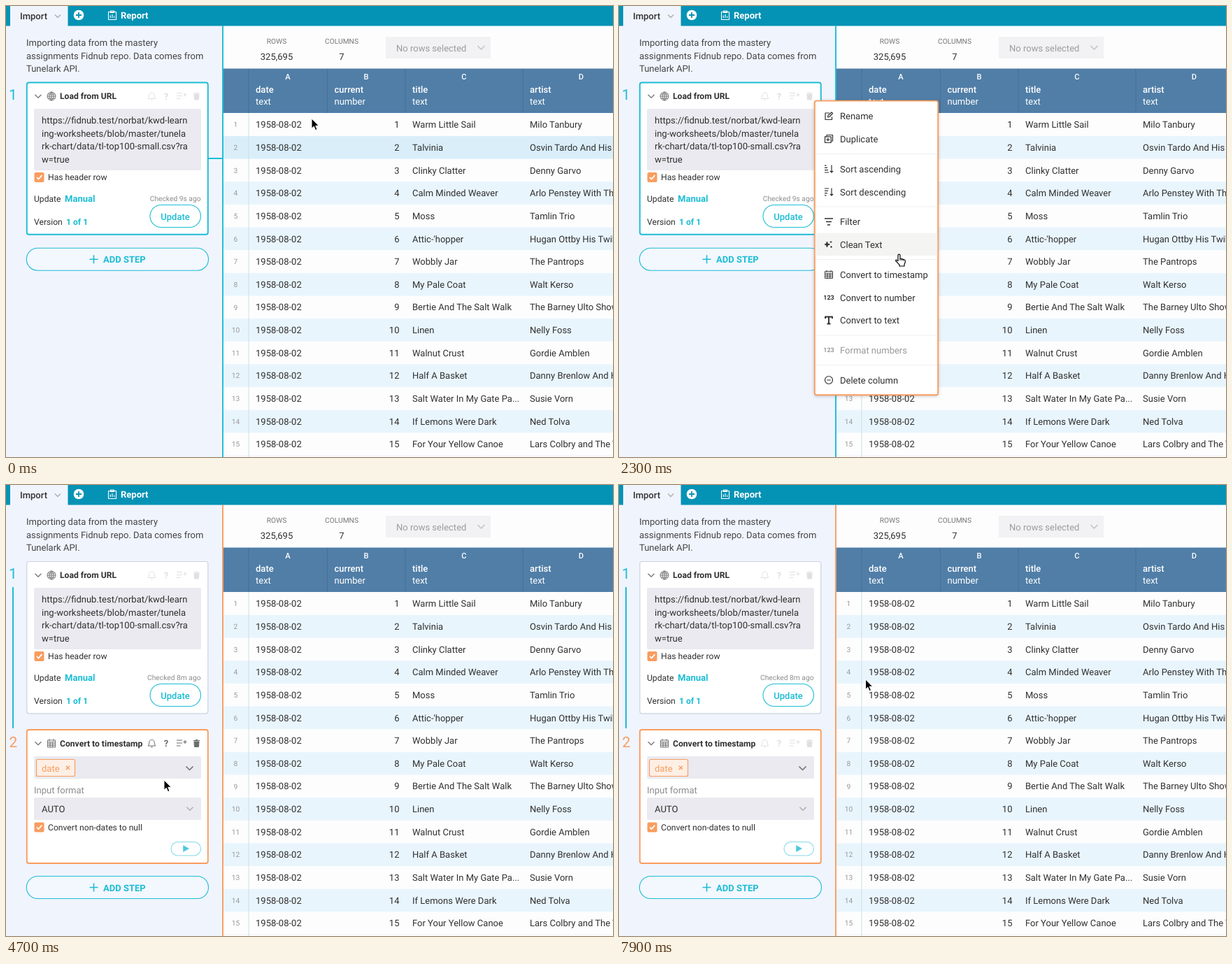
Write an HTML page that moves like this. It is 868 by 645 pixels and loops after 8000 ms.

```html
<!DOCTYPE html>
<html lang="en">
<head>
<meta charset="utf-8">
<title>Convert a column to timestamp</title>
<style>
  html, body { margin: 0; width: 100%; height: 100%; overflow: hidden; background: #fdfdfe; }
  svg { display: block; width: 868px; height: 645px; }
  text { font-family: Roboto, "Liberation Sans", sans-serif; text-rendering: geometricPrecision; white-space: pre; }
  #menu { filter: drop-shadow(0 1px 2px rgba(0, 0, 0, .2)); }
</style>
</head>
<body>
<svg id="stage" viewBox="0 0 868 645" xmlns="http://www.w3.org/2000/svg"></svg>
<script>
const LOOP = 8000, STEP = 100;
const TEAL = '#1cbdd4', ORANGE = '#f99d5f', INK = '#303030', GRAY = '#8c8c8c', PANEL = '#f0f4fd', FIELD = '#eaeaf0';
const BASE = 13.03, SMALL = 12.13, TINY = 10.26, ROW = 32.645;
const TIMES = { button: [700, 1500], menu: [1000, 3000], done: 3000, card: 3900, tools: [4300, 6400] };

// ---- drawing helpers; text is placed by the middle of its capitals ----
const text = (x, y, s, { size = BASE, fill = INK, weight = 400, anchor = 'start' } = {}) =>
  `<text x="${x}" y="${(y + size * 0.355).toFixed(2)}" font-size="${size}" fill="${fill}" font-weight="${weight}" text-anchor="${anchor}">${s}</text>`;
const rect = (x, y, w, h, fill, stroke = 'none', sw = 1, r = 0) =>
  `<rect x="${x}" y="${y}" width="${w}" height="${h}" rx="${r}" fill="${fill}" stroke="${stroke}" stroke-width="${sw}"/>`;
const line = (d, stroke = INK, sw = 1.2, fill = 'none') =>
  `<path d="${d}" fill="${fill}" stroke="${stroke}" stroke-width="${sw}" stroke-linejoin="round"/>`;
const at = (x, y, body) => `<g transform="translate(${x} ${y})">${body}</g>`;
const group = (id, body) => `<g id="${id}">${body}</g>`;
const chevron = (x, y, c = '#777', r = 4.5, sw = 1.3) => at(x, y, line(`M${-r} ${-r / 2}L0 ${r / 2}L${r} ${-r / 2}`, c, sw));
const checkbox = (y, label) => rect(40.5, y - 7, 14, 14, ORANGE, 'none', 0, 2) +
  at(47.5, y, line('M-3.5 0L-1 2.6L3.8-2.8', '#fff', 1.8)) + text(60, y, label, { size: SMALL });

// ---- icons, each centred on 0,0 ----
const icon = {
  edit: c => line('M1-4.5H-5V5H4.5V1M-1.5 1.5L-1-1L4-5.5L5.5-4L1 1Z', c),
  copy: c => line('M-3-3.5V-5.5H5.5V3H3.5M-5.5-3.2H3.2V5.5H-5.5ZM-1.2-1.2V3.5M-3.5 1.2H1.2', c),
  up: c => line('M-6 5H0M-6 1.7H-1M-6-1.6H-2M-6-4.9H-3.5M4-5.5V5M1.8 2.8L4 5L6.2 2.8', c),
  down: c => line('M-6-5H0M-6-1.7H-1M-6 1.6H-2M-6 4.9H-3.5M4-5.5V5M1.8 2.8L4 5L6.2 2.8', c),
  filter: c => line('M-6-4.5H6M-4 0H4M-2 4.5H2', c, 1.5),
  sparkle: c => line('M-2.5-4L-1.5-1L1.5 0L-1.5 1L-2.5 4L-3.5 1L-6 0L-3.5-1ZM3-5V-2M1.5-3.5H4.5M3.5 2V5M2 3.5H5', c, .9, c),
  calendar: c => line('M-5.5-4.5H5.5V5.5H-5.5ZM-5.5-1.8H5.5M-5.5 .7H5.5M-5.5 3.1H5.5M-2-1.8V5.5M1.7-1.8V5.5M-3-6.3V-3.5M3-6.3V-3.5', c, .9),
  digits: c => text(0, 0, '123', { size: 9, fill: c, weight: 700, anchor: 'middle' }),
  type: c => line('M-5-2.5V-5H5V-2.5M0-5V5M-2.5 5H2.5', c, 1.9),
  minus: c => line('M-5.5 0a5.5 5.5 0 1 0 11 0a5.5 5.5 0 1 0-11 0M-2.8 0H2.8', c),
  globe: c => line('M-6 0a6 6 0 1 0 12 0a6 6 0 1 0-12 0H6M0-6V6M0-6C-4-3-4 3 0 6C4 3 4-3 0-6M-5-3H5M-5 3H5', c, .9),
  bell: c => line('M-5.5 3.5C-3.5 2-4-1-3.5-2.5C-2.5-6 2.5-6 3.5-2.5C4-1 3.5 2 5.5 3.5ZM-1.3 5.3H1.3', c, 1),
  list: c => line('M-7-4.5H1M-7-.5H1M-7 3.5H-1.5M2.5-2H7.5M5-4.5V.5', c),
  trash: c => line('M-3.5-2.5H3.5L3 5H-3ZM-4.8-4H4.8M-1.5-5H1.5', c, 1, c)
};
const tools = (y, c) => at(208.5, y, icon.bell(c)) +
  text(229, y, '?', { fill: c, weight: 700, anchor: 'middle' }) +
  at(251, y, icon.list(c)) + at(272.5, y, icon.trash(c));
const cardHead = (y, glyph, title) => chevron(46, y) + at(65, y, icon[glyph]('#666')) +
  text(77, y, title, { size: SMALL, weight: 700 });

// ---- table data ----
const rows = [
  ['Warm Little Sail', 'Milo Tanbury'], ['Talvinia', 'Osvin Tardo And His Quintet'],
  ['Clinky Clatter', 'Denny Garvo'], ['Calm Minded Weaver', 'Arlo Penstey With The Lows'],
  ['Moss', 'Tamlin Trio'], ["Attic-'hopper", 'Hugan Ottby His Twilight Guests'],
  ['Wobbly Jar', 'The Pantrops'], ['My Pale Coat', 'Walt Kerso'],
  ['Bertie And The Salt Walk', 'The Barney Ulto Show'], ['Linen', 'Nelly Foss'],
  ['Walnut Crust', 'Gordie Amblen'], ['Half A Basket', 'Danny Brenlow And His Rovers'],
  ['Salt Water In My Gate Pa...', 'Susie Vorn'], ['If Lemons Were Dark', 'Ned Tolva'],
  ['For Your Yellow Canoe', 'Lars Colbry and The Tidemen']
];
const columns = [[347, 403, 'A', 'date', 'text'], [459.5, 515, 'B', 'current', 'number'],
  [571, 655, 'C', 'title', 'text'], [739, 822.5, 'D', 'artist', 'text']];

const menu = [[157.5, 'edit', 'Rename'], [190, 'copy', 'Duplicate'], [233, 'up', 'Sort ascending'],
  [266, 'down', 'Sort descending'], [308.5, 'filter', 'Filter'], [341, 'sparkle', 'Clean Text'],
  [384, 'calendar', 'Convert to timestamp'], [417, 'digits', 'Convert to number'],
  [449.5, 'type', 'Convert to text'], [492, 'digits', 'Format numbers'], [535, 'minus', 'Delete column']];
const DISABLED = 'Format numbers';

function table() {
  const mid = { anchor: 'middle' };
  let s = rect(310, 28, 558, 617, '#fdfdfe') +
    text(387, 50.5, 'ROWS', { ...mid, size: TINY, fill: '#777' }) + text(387, 72, '325,695', mid) +
    text(480, 50.5, 'COLUMNS', { ...mid, size: TINY, fill: '#777' }) + text(480, 72, '7', mid) +
    rect(543, 44, 150, 31, '#f2f2f4') + text(558, 60, 'No rows selected', { fill: '#9c9c9c' }) +
    chevron(679.5, 59.5, '#c2c2c2', 5, 1.5);
  rows.forEach(([title, artist], i) => {
    const top = 153.3 + ROW * i, y = 169.7 + ROW * i;
    if (i % 2) s += `<rect ${i === 1 ? 'id="second"' : ''} x="310" y="${top}" width="558" height="${ROW}" fill="#e9f5fd"/>`;
    s += text(328.5, y, i + 1, { ...mid, size: TINY, fill: '#999' }) + text(357, y, '1958-08-02') +
      text(562.5, y, i + 1, { anchor: 'end' }) + text(581, y, title) + text(749, y, artist);
  });
  s += line('M310 643H868', '#eef2f6', 1) + line('M347 153V645', '#cfdfe2', 1) + rect(310, 89.5, 558, 63.5, '#507ea7');
  for (const [x, cx, letter, name, kind] of columns) {
    s += line(`M${x} 90V153`, '#456f98', 1) +
      text(cx, 101.5, letter, { ...mid, size: 11.2, fill: '#fff', weight: 500 }) +
      text(x + 10, 119.5, name, { fill: '#fff', weight: 500 }) + text(x + 10, 136.5, kind, { fill: '#fff' });
  }
  return s;
}

function topBar() {
  return rect(0, 0, 868, 28.5, '#0593b5') + rect(6, 0, 82.5, 29, PANEL) +
    text(20, 14, 'Import', { weight: 500 }) + chevron(74, 14.5, '#aaa', 4) +
    '<circle cx="104" cy="13" r="7.3" fill="#fff"/>' + line('M100 13H108M104 9V17', '#0593b5', 1.8) +
    at(152, 13.5, line('M-5.5-5H5.5V6H-5.5ZM-2.5-6.5H2.5V-4H-2.5ZM-2.7 3.5V0M0 3.5V-1.5M2.7 3.5V1', '#fff', 1.1)) +
    text(164, 13.5, 'Report', { fill: '#fff', weight: 700 });
}

function firstCard() {
  const url = ['https://fidnub.test/norbat/kwd-learn', 'ing-worksheets/blob/master/tunela',
    'rk-chart/data/tl-top100-small.csv?ra', 'w=true'];
  return text(10, 127, '1', { size: 21, fill: TEAL, anchor: 'middle' }) +
    `<rect id="frame" x="29.8" y="109.5" width="259" height="217.3" rx="3" fill="#fff"/>` +
    cardHead(129, 'globe', 'Load from URL') + tools(129, '#e0e0e4') + rect(40, 147, 239, 88, FIELD, 'none', 0, 2) +
    url.map((s, i) => text(51, 163.3 + 18.65 * i, s)).join('') +
    checkbox(245, 'Has header row') +
    text(40, 275.5, 'Update', { size: SMALL }) + text(84, 275.5, 'Manual', { fill: TEAL, weight: 700 }) +
    group('fresh', text(278.5, 275.5, 'Checked 9s ago', { size: TINY, fill: GRAY, anchor: 'end' })) +
    group('stale', text(278.5, 275.5, 'Checked 8m ago', { size: TINY, fill: GRAY, anchor: 'end' })) +
    text(40, 308.5, 'Version', { size: SMALL }) + text(86, 308.5, '1 of 1', { fill: TEAL, weight: 700, size: SMALL }) +
    rect(206, 284.5, 72.5, 32, '#fff', TEAL, 1.1, 16) +
    text(242, 301.3, 'Update', { fill: TEAL, weight: 500, anchor: 'middle' });
}

function secondCard() {
  return text(10.5, 367.5, '2', { size: 21, fill: ORANGE, anchor: 'middle' }) +
    rect(29.8, 350, 259, 191, '#fff', ORANGE, 1.9, 3) + cardHead(369.5, 'calendar', 'Convert to timestamp') +
    group('faint', tools(369.5, '#e0e0e4')) + group('dark', tools(369.5, '#6c6c6c')) +
    rect(40, 388, 239, 32, FIELD, 'none', 0, 2) + rect(43.5, 392.5, 55, 24, '#fdefe5', ORANGE, 1.2, 2) +
    text(51, 405, 'date', { fill: ORANGE }) + line('M85.8 401.8L91 407M91 401.8L85.8 407', ORANGE, 1.4) +
    chevron(262.5, 405, '#777', 5, 1.7) + text(40, 436.5, 'Input format', { fill: GRAY }) +
    rect(40, 447, 239, 32, FIELD, 'none', 0, 2) + text(51, 463.5, 'AUTO') + chevron(263, 463, '#aaa', 4.5) +
    checkbox(489.5, 'Convert non-dates to null') + rect(236, 510.5, 42.5, 19.5, '#fff', '#83d8e8', 1.1, 9.75) +
    line('M253.5 515.5V524.5L261.5 520Z', '#4cc8dd', .5, '#4cc8dd');
}

function sidePanel() {
  const about = ['Importing data from the mastery', 'assignments Fidnub repo. Data comes from', 'Tunelark API.'];
  return rect(0, 28.5, 310, 617, PANEL) + about.map((s, i) => text(29, 52.5 + 18.65 * i, s, { fill: '#444' })).join('') +
    group('link', line('M289 218H309', TEAL, 2)) + group('rail', line('M10 146V348', TEAL, 2)) + firstCard() +
    group('card', secondCard()) +
    group('add', rect(29.3, -16, 260.2, 32, '#f3f7fe', TEAL, 1.1, 16) + line('M119.5 0H131.5M125.5-6V6', TEAL, 1.6) +
      text(139, .5, 'ADD STEP', { fill: TEAL, weight: 700 })) +
    '<path id="edge" d="M310 28.5V645" stroke-width="1.9"/>';
}

function popup() {
  const items = menu.map(([y, glyph, label]) => {
    const c = label === DISABLED ? '#999' : INK;
    return at(300, y, icon[glyph](c)) + text(316, y + .3, label, { fill: c });
  }).join('');
  const rules = [211.5, 287, 362.5, 471, 513.5].map(y => line(`M281 ${y}H455`, '#f0f0f4', 1)).join('');
  return rect(279.8, 135.6, 176.4, 420.6, '#fff', ORANGE, 1.9, 3) +
    '<rect id="hover" x="280.8" width="174.4" height="32.6" fill="#f4f4f2"/>' + rules + items;
}

const arrow = line('M0 0V14.2L3.3 11.2L5.6 16.6L8 15.6L5.7 10.3H10.2Z', '#fff', 1, '#000');
const hand = line('M-1 1C-1-.8 2-.8 2 1V6L4 6.1L6.5 6.8L9 8C9.8 9 9 12.5 8 14V16.5H1V14.5C-1 12.5-2.5 10.8-4.3 9C-4.5 7.2-2.7 7.4-1 9Z', '#000', 1.2, '#fff') +
  line('M2 6V8.5M4.3 6.3V8.7M6.6 7V9', '#000', .9);

const stage = document.getElementById('stage');
stage.innerHTML = table() + sidePanel() + topBar() +
  group('button', `<circle cx="445.5" cy="121" r="11.5" fill="${ORANGE}"/>` + chevron(445.5, 121.5, '#fff', 5, 1.6)) +
  group('menu', popup()) + group('cursor', group('arrow', arrow) + group('hand', hand));

// ---- motion ----
const path = [[0, 437, 161], [300, 437, 161], [900, 442, 127], [1300, 442, 127], [2200, 400, 355.5], [2350, 400, 355.5],
  [2700, 400, 382], [3700, 400, 382], [4700, 226, 422], [5500, 226, 422], [6300, 308, 394], [7900, 352.5, 278]];

function cursorAt(t) {
  const i = path.findIndex(p => p[0] > t);
  if (i < 0) return path[path.length - 1].slice(1);
  const [t0, x0, y0] = path[i - 1], [t1, x1, y1] = path[i];
  const u = (t - t0) / (t1 - t0), e = u * u * (3 - 2 * u);
  return [x0 + (x1 - x0) * e, y0 + (y1 - y0) * e];
}

const $ = id => document.getElementById(id);
const show = (id, on) => $(id).setAttribute('display', on ? 'inline' : 'none');
const within = (t, [a, b]) => t >= a && t < b;

function draw(now) {
  const t = Math.floor((now % LOOP) / STEP) * STEP;
  const [x, y] = cursorAt(t), open = within(t, TIMES.menu), done = t >= TIMES.done;
  const card = t >= TIMES.card, lit = within(t, TIMES.tools), pointing = t >= 800 && !done;

  show('button', within(t, TIMES.button));
  show('menu', open);
  const item = menu.find(m => Math.abs(m[0] - y) < 16.3);
  show('hover', open && item && item[2] !== DISABLED);
  if (item) $('hover').setAttribute('y', item[0] - 16.3);

  show('link', !done);
  show('rail', done);
  show('fresh', !done);
  show('stale', done);
  show('card', card);
  show('dark', card && lit);
  show('faint', card && !lit);
  $('frame').setAttribute('stroke', done ? '#ccd2e2' : TEAL);
  $('frame').setAttribute('stroke-width', done ? 1.2 : 1.9);
  $('edge').setAttribute('stroke', done ? ORANGE : TEAL);
  $('second').setAttribute('fill', t < 400 ? '#daeefa' : '#e9f5fd');
  $('add').setAttribute('transform', `translate(0 ${card ? 575.5 : done ? 382.5 : 362.2})`);

  show('arrow', !pointing);
  show('hand', pointing);
  $('cursor').setAttribute('transform', `translate(${x.toFixed(1)} ${y.toFixed(1)})`);
}

function tick() {
  draw(performance.now());
  requestAnimationFrame(tick);
}
tick();
</script>
</body>
</html>
```
